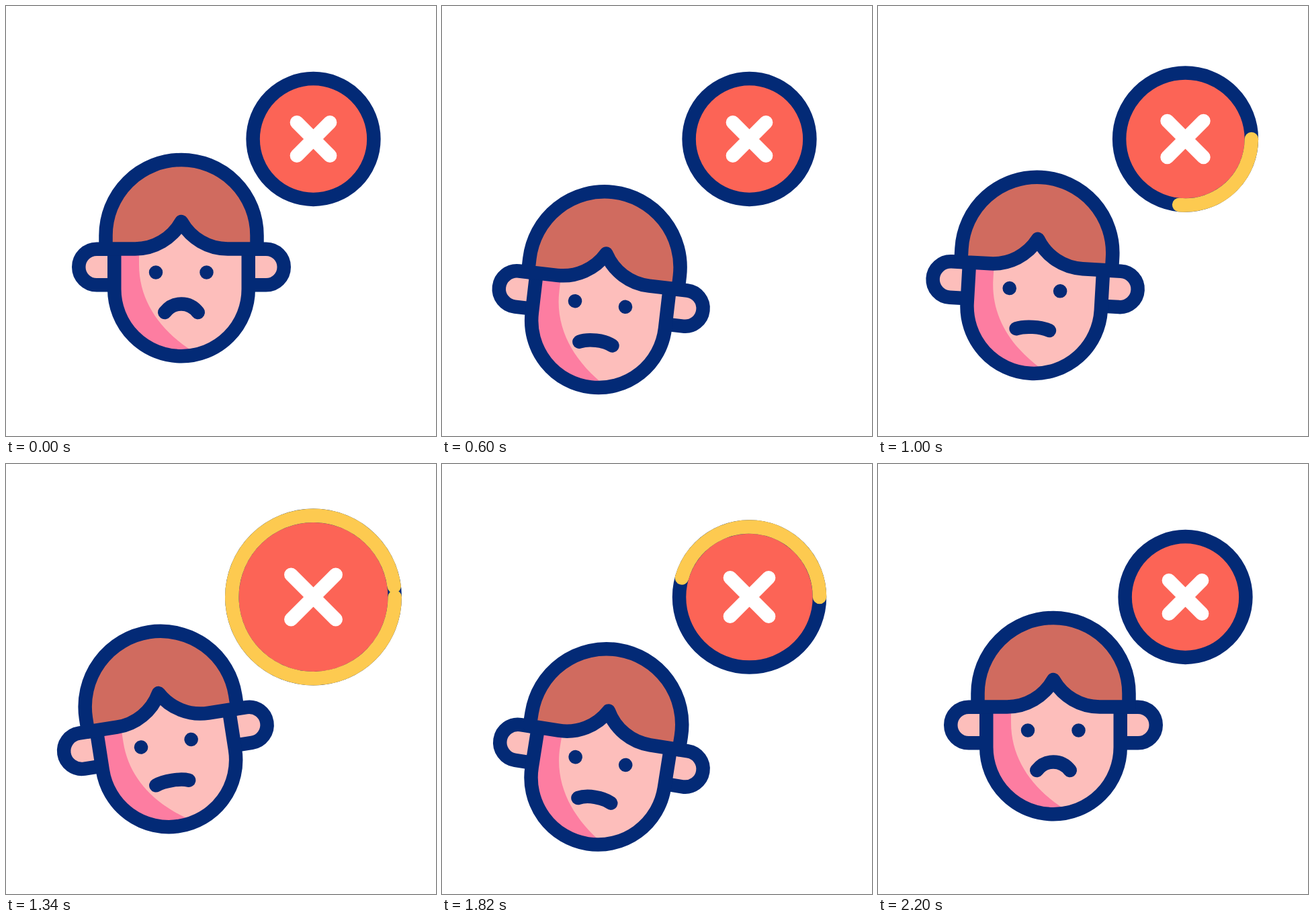
An HTML page that plays this animation: 640x640 px, repeating every 2400 ms.

```html
<!DOCTYPE html>
<html lang="en">
<head>
<meta charset="utf-8">
<title>Rejected</title>
<style>
  html, body { margin: 0; height: 100%; overflow: hidden; background: #fff; }
  svg { display: block; width: 100vw; height: 100vh; }
  .line { fill: none; stroke: #032a76; stroke-width: 20.5; stroke-linecap: round; stroke-linejoin: round; }
  .skin { fill: #fdbebb; }
  .hair { fill: #d06b5f; }
</style>
</head>
<body>
<svg viewBox="0 0 640 640">
  <g id="head">
    <path class="line skin" d="M161 361.75H135a26.75 26.75 0 0 0 0 53.5H161"/>
    <path class="line skin" d="M361 361.75H387a26.75 26.75 0 0 1 0 53.5H361"/>
    <path class="skin" d="M161.25 361.5V421.5a99.75 99.75 0 0 0 199.5 0V361.5L261 321Z"/>
    <path fill="#fd7da1" d="M161.25 361.5V421.5A99.75 99.75 0 0 0 285 518.3C232 487 198 441 198 385V361.5Z"/>
    <path class="line" d="M161.25 361.5V421.5a99.75 99.75 0 0 0 199.5 0V361.5"/>
    <path class="line hair" d="M148.5 361.5V341.5a112.5 112.5 0 0 1 225 0V361.5H330A79 79 0 0 1 261 321A79 79 0 0 1 192 361.5Z"/>
    <path class="line" d="M223 396.5h.01M298.5 396.5h.01"/>
    <path class="line" id="mouth"/>
  </g>
  <g transform="translate(457.5 198)">
    <circle class="line" id="disc" style="fill:#fc6456"/>
    <path class="line" id="arc" style="stroke:#fdca50"/>
    <path class="line" id="cross" style="stroke:#fff"/>
  </g>
</svg>
<script>
const { PI, sin, cos, min, max } = Math;
const [head, mouth, disc, arc, cross] =
  ['head', 'mouth', 'disc', 'arc', 'cross'].map(id => document.getElementById(id));
const clamp = (v, lo, hi) => max(lo, min(hi, v));
const ease = (t, from, to) => (1 - cos(PI * clamp((t - from) / (to - from), 0, 1))) / 2;

function drawHead(t) {
  const amount = ease(t, 210, 722) - ease(t, 1688, 2200);
  const w = PI * clamp((t - 1205) / 483, -1, 1);
  const x = amount * (-26 + 2 * cos(w) + 1.4 * sin(w));
  const y = amount * (32.3 - 19.9 * cos(w) + 2 * cos(2 * w));
  const tilt = 9 * (ease(t, 205, 810) - 2 * ease(t, 810, 1310)
    + 2 * ease(t, 1310, 1810) - ease(t, 1810, 2200));
  head.setAttribute('transform', `translate(${x} ${y}) rotate(${tilt} 261 388.5)`);
  const lift = 456 - 16.8 + 11.8 * amount;
  mouth.setAttribute('d', `M236.3 456C249 ${lift} 273 ${lift} 285.7 456`);
}

function drawBadge(t) {
  const grow = ease(t, 793, 1397), shrink = ease(t, 1397, 2200);
  const r = 89.9 + 32 * (grow - shrink), c = r * 0.274;
  disc.setAttribute('r', r);
  cross.setAttribute('d', `M${-c} ${-c}L${c} ${c}M${c} ${-c}L${-c} ${c}`);

  // The yellow arc is drawn clockwise from the right, then erased the same way.
  const a = 2 * PI * shrink, b = 2 * PI * grow, mid = (a + b) / 2;
  const at = angle => `${r * cos(angle)} ${r * sin(angle)}`;
  const to = angle => `A${r} ${r} 0 0 1 ${at(angle)}`;
  arc.setAttribute('d', b - a > 1e-4 ? `M${at(a)}${to(mid)}${to(b)}` : '');
}

function frame() {
  const t = performance.now() % 2400;
  drawHead(t);
  drawBadge(t);
  requestAnimationFrame(frame);
}
frame();
</script>
</body>
</html>
```
